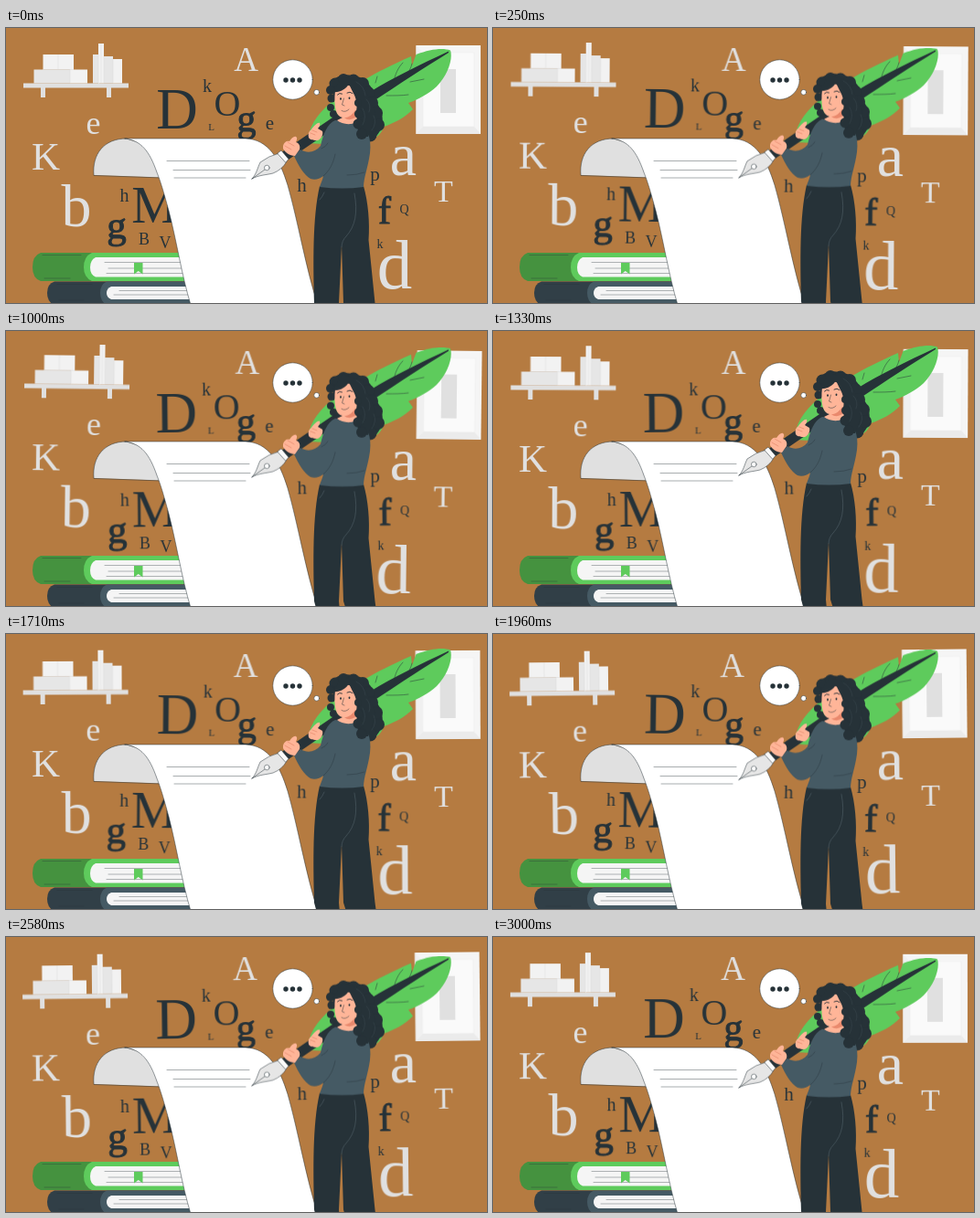
These frames come from a looping animation (526 px wide and 301 px high, 3.04 s). An HTML page:

```html
<!DOCTYPE html>
<html lang="en">
<head>
<meta charset="utf-8">
<title>Writing with a quill</title>
<style>
html, body { margin: 0; width: 100%; height: 100%; overflow: hidden; background: #b57b41; }
svg { display: block; width: 100vw; height: 100vh; }
text { font-family: "Liberation Serif", "Times New Roman", serif; text-anchor: middle; }
.heavy { stroke: #263238; stroke-width: 1; }
.sway { transform-box: view-box; transform-origin: 269px 150px; animation: sway 3040ms linear infinite; }
.quick { animation-duration: 1520ms; }
.float { animation: float 3040ms linear infinite; }
@keyframes sway {
  0%, 100% { transform: rotate(0deg); }
  25% { transform: rotate(1deg); }
  75% { transform: rotate(-1deg); }
}
@keyframes float {
  0%, 100% { transform: translateY(0); }
  50% { transform: translateY(-8px); }
}
.ink { fill: #263238; }
.line { fill: none; stroke: #263238; stroke-width: .5; stroke-linecap: round; stroke-linejoin: round; }
.skin { fill: #ffb598; }
.crease { fill: none; stroke: #d9785d; stroke-width: .5; stroke-linecap: round; }
</style>
</head>
<body>
<svg viewBox="0 0 526 301" preserveAspectRatio="none">
  <rect width="526" height="301" fill="#b57b41"/>

  <!-- wall -->
  <g class="sway" fill="#e0e0e0">
    <path d="M19 60.500H134V65.500H19ZM38 65h5v11h-5ZM110 65h5v11h-5Z"/>
    <path fill="#e6e6e6" d="M30.500 45.500H70V60.500H30.500ZM95 29h7V60.500h-7ZM107 31h10V60.500h-10Z"/>
    <path fill="#f2f2f2" d="M70 45.500H89V60.500H70ZM40.500 29H74V45.500H40.500ZM101 17h6V60.500h-6ZM117 34h10V60.500h-10Z"/>
    <path d="M57 29V45M70 45V60M101 29V60M107 31V60M117 34V60M104 17V60M40 45.500H74" fill="none" stroke="#d8d8d8" stroke-width=".5"/>
    <rect x="448.500" y="19" width="70.500" height="97" fill="#f5f5f5"/>
    <path d="M448.500 19L456 27V108L448.500 116Z" fill="#f0f0f0"/>
    <path d="M448.500 116L456 108H512L519 116Z" fill="#ebebeb"/>
    <rect x="456" y="27" width="56" height="81" fill="#fafafa" stroke="#ebebeb" stroke-width=".5"/>
    <rect x="475" y="45" width="17" height="48" fill="#e0e0e0"/>
    <text x="262.500" y="47" font-size="37">A</text>
    <text x="95.500" y="116" font-size="36">e</text>
    <text x="43.500" y="155" font-size="43">K</text>
    <text x="77" y="217" font-size="66">b</text>
    <text x="434.500" y="161" font-size="66">a</text>
    <text x="478.500" y="189.500" font-size="34">T</text>
    <text x="425" y="284.500" font-size="77">d</text>
  </g>

  <!-- dark letters -->
  <g class="sway quick ink">
    <text x="187" y="110" font-size="63">D</text>
    <text x="220" y="70" font-size="20">k</text>
    <text x="242" y="96" font-size="40">O</text>
    <text x="263" y="113" font-size="42" class="heavy">g</text>
    <text x="224.500" y="112" font-size="11">L</text>
    <text x="288.500" y="111" font-size="21">e</text>
    <text x="129.500" y="189.500" font-size="20">h</text>
    <text x="162.500" y="213" font-size="57">M</text>
    <text x="121" y="229.500" font-size="43" class="heavy">g</text>
    <text x="151" y="237" font-size="18">B</text>
    <text x="174" y="241" font-size="18">V</text>
    <text x="323.500" y="178.500" font-size="21">h</text>
    <text x="403.500" y="167" font-size="21">p</text>
    <text x="414" y="213.500" font-size="42" class="heavy">f</text>
    <text x="435.500" y="203" font-size="14">Q</text>
    <text x="409" y="240.500" font-size="14">k</text>
  </g>

  <!-- books -->
  <path d="M215 246H38Q29 249 29 262Q29 274 38 277H215Z" fill="#45923f"/>
  <path d="M215 246H94Q85 250 85 262Q85 273 94 277H215Z" fill="#5ecb5c"/>
  <path d="M215 251H98Q92 254 92 262Q92 270 98 272.500H215Z" fill="#f5f5f5"/>
  <path class="line" d="M108 256.500H200M112 263H200M110 268.500H200M40 248.500H82M42 274H70" stroke-opacity=".7"/>
  <path d="M140 257H149.500V269.500L144.700 266L140 269.500Z" fill="#5ecb5c"/>
  <path d="M215 277.500H53Q45 280 45 290Q45 299 52 303H215Z" fill="#313f47"/>
  <path d="M215 277.500H110Q103 281 103 290Q103 299 110 303H215Z" fill="#455a64"/>
  <path d="M215 283H115Q110 285 110 290Q110 295 115 297H215Z" fill="#f5f5f5"/>
  <path class="line" d="M124 287.500H200M118 292H200M56 280.500H94M58 298H85" stroke-opacity=".7"/>

  <!-- sheet -->
  <path class="line" style="fill:#e0e0e0" d="M96 161C94 138 107 121 132 121L160 130L168 163.500Z"/>
  <path class="line" style="fill:#fff" d="M130 121H262C287 122 299 143 308 172C319 210 328 264 341 303H202C192 270 187 235 178 200C172 178 169 168 165 158C157 135 148 123 130 121Z"/>
  <path class="line" d="M176 145.500H266M183 155.500H267M184 164H262" stroke-opacity=".8"/>

  <!-- thought bubble -->
  <circle class="line" style="fill:#fff" cx="313.500" cy="56.500" r="21.700"/>
  <g class="ink"><circle cx="306" cy="57" r="2.700"/><circle cx="313.500" cy="57" r="2.700"/><circle cx="321" cy="57" r="2.700"/></g>

  <g class="float">
    <!-- feather -->
    <path fill="#5ecb5c" d="M330 126C330 110 339 95 356 81C376 65 402 49 443 31L444 41L448.500 29C464 23 478 21.500 486 24.500C489 34 483 52 471 64C462 72 451 78 440 82L445 89C436 98 425 104 413 108C411 114 408 118 402 121C380 126 350 128 330 126Z"/>
    <path class="line" d="M424 60C425 51 429 43 434 38M436 54C440 49 443 44 444 39M416 74C425 74 433 74 440 73M404 60L406 53M442 59L457 56"/>
    <path class="ink" d="M484 25.500C453 40 424 54 398 70L300 137L306 146L402 80C429 62 458 43 484 27Z"/>

    <!-- nib -->
    <path class="line" style="fill:#e6e6e6" d="M269 165C274 160 275 153 278 147Q287 140 299 137L307 146Q302 155 292 159C284 161 276 161 269 165Z"/>
    <path class="line" style="fill:#fafafa" d="M297 137L301 134L309 143.500L306 147Z"/>
    <path class="line" d="M269 165L283 155"/>
    <circle class="line" style="fill:#fff" cx="285.300" cy="153" r="2.800"/>

    <!-- far hand -->
    <path class="skin" d="M331 120C330 116 331 113 334 111C337 107 341 103 343 104C344 106 342 109 341 110L346 113C347 117 345 121 341 123C337 123 333 123 331 120Z"/>
    <path class="crease" d="M333 115L338 117M335 112L340 114"/>

    <!-- trousers -->
    <path class="ink" d="M343 173H391C396 190 398 213 396.500 232L403.500 301L405 312H372.500L369 301L367 238L364 301L365 312H340L337 301C336 258 335 208 343 173Z"/>
    <path class="line" style="stroke:#5b6b73" d="M381 181C385 202 382 217 372 228Q367 233 367 240M348 180Q346 185 343 188"/>

    <!-- hair behind -->
    <g class="ink">
      <path d="M355 66C355 54 367 49 379 52C393 53 403 65 406 83C414 93 414 111 404 119C399 127 389 124 386 116L366 94Z"/>
      <circle cx="360" cy="61" r="6.500"/><circle cx="369" cy="56" r="6"/><circle cx="380" cy="57" r="6.500"/>
      <circle cx="390" cy="61" r="7"/><circle cx="396" cy="71" r="7"/><circle cx="400" cy="82" r="7"/>
      <circle cx="405" cy="93" r="7"/><circle cx="407" cy="106" r="7"/><circle cx="398" cy="117" r="7.500"/>
      <circle cx="355" cy="68" r="5"/><circle cx="356" cy="77" r="4.500"/><circle cx="355" cy="87" r="4"/><circle cx="358" cy="94" r="4"/>
    </g>

    <!-- sweater -->
    <path fill="#455a64" d="M360 101C351 105 347 116 344 129C338 136 330 138 322 133L315 140C320 151 326 161 333 165C338 167 343 165 347 162C346 167 344 170 343 174Q368 177 391 174C391 164 396 152 398 137C400 120 395 108 383 103Z"/>
    <path class="line" d="M347 162C354 156 358 148 360 138M345 132Q350 130 352 126M373 161Q384 161 392 158" stroke-opacity=".75"/>

    <!-- face -->
    <path class="skin" d="M360 68C363 61 379 60 385 70V91L383 103C376 107 367 105 362 101L368 98C361 97 358 87 360 68Z"/>
    <path d="M370 98.500Q378 97 382 90L382 98Q376 102 370 98.500Z" fill="#e9896d"/>
    <path class="line" style="stroke-width:.9" d="M362.500 73Q364.500 70.500 367.500 72M373 71Q376 69 379 71.500"/>
    <g class="ink"><ellipse cx="366" cy="77.500" rx=".9" ry="1.300"/><ellipse cx="375.500" cy="76.800" rx=".9" ry="1.300"/></g>
    <path class="line" d="M369.500 77L367.500 84L370 85M367 90.500Q371 93 375 89"/>

    <!-- front hair -->
    <g class="ink">
      <path d="M357 70C365 71 372 67 375 61C378 69 382 73 383 80C385 87 381 94 385 101C381 110 388 119 396 119L404 93L390 60L368 53Z"/>
      <circle cx="385" cy="82" r="4"/><circle cx="386" cy="94" r="5"/><circle cx="385" cy="105" r="5.500"/><circle cx="389" cy="116" r="6"/>
    </g>
    <path class="line" style="stroke:#52616a" d="M383 59Q392 64 393 74M394 78Q400 84 397 92M390 88Q395 97 390 106M402 96Q406 104 400 112" stroke-opacity=".5"/>

    <!-- near hand -->
    <path class="skin" d="M303 129C304 125 307 123 310 124C312 121 315 118 317 119C319 120 318 123 317 125C321 126 322 130 321 133L316 140C310 140 305 136 303 132Z"/>
    <path class="crease" d="M305 129L312 133M308 125L315 129"/>
  </g>
  <circle class="line" style="fill:#fff" cx="339.700" cy="70.300" r="2.900"/>
</svg>
</body>
</html>
```
